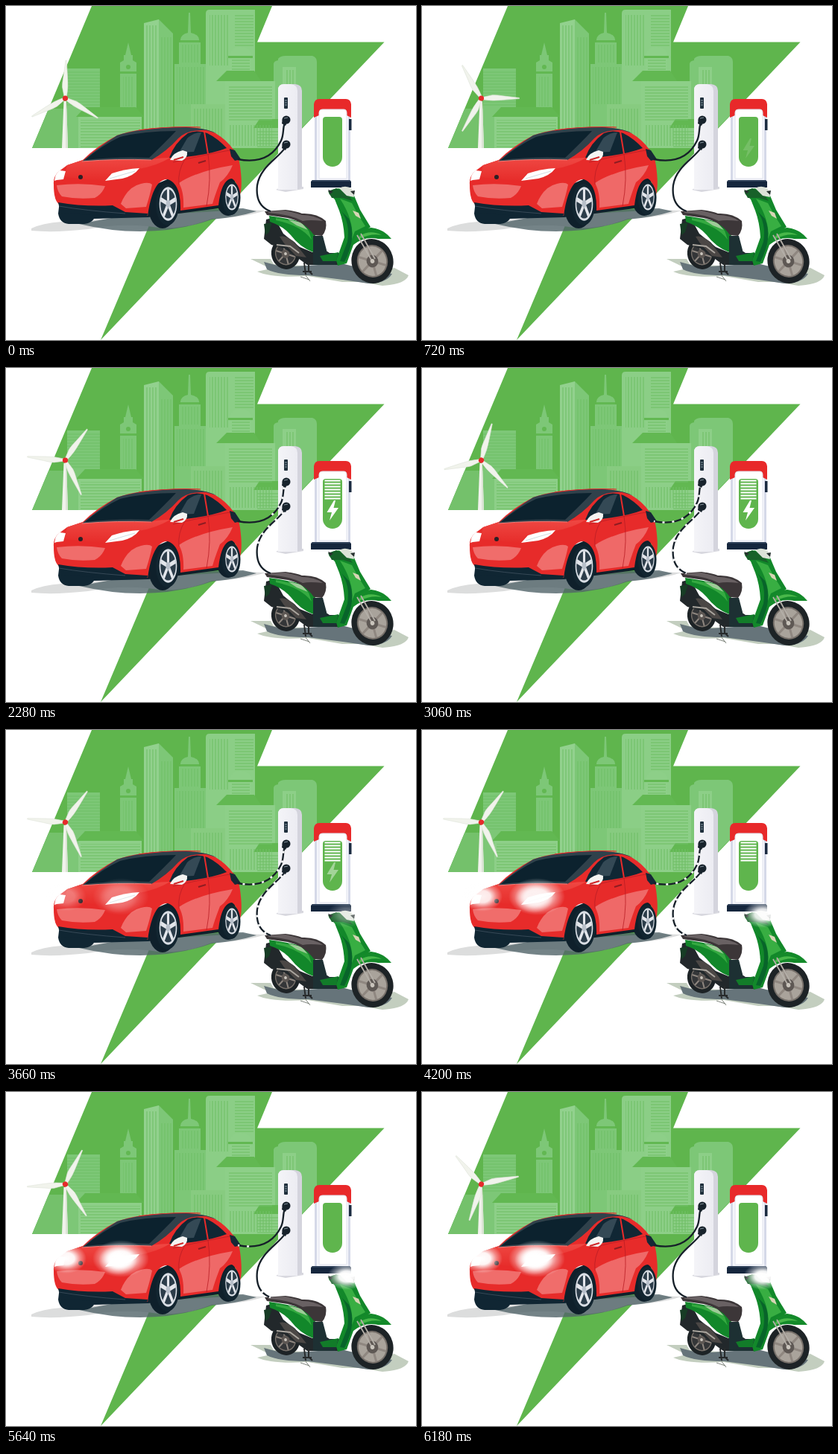
An HTML page that plays this animation: 550 by 449 pixels, repeating every 6.24 s.

```html
<!DOCTYPE html>
<html lang="en">
<head>
<meta charset="utf-8">
<title>Electric charging</title>
<style>
html, body { margin: 0; width: 100%; height: 100%; overflow: hidden; background: #fff; }
svg { display: block; width: 100%; height: 100%; }
</style>
</head>
<body>
<svg viewBox="0 0 550 449">
<defs>
  <pattern id="rows" width="8" height="4" patternUnits="userSpaceOnUse"><path d="M0 1H8" stroke="#6fbf66" stroke-width="1.1"/></pattern>
  <pattern id="cols" width="4" height="8" patternUnits="userSpaceOnUse"><path d="M1 0V8" stroke="#6fbf66" stroke-width="1.1"/></pattern>
  <radialGradient id="beam">
    <stop offset="0" stop-color="#fff"/><stop offset=".4" stop-color="#fff" stop-opacity=".95"/>
    <stop offset=".7" stop-color="#fff" stop-opacity=".4"/><stop offset="1" stop-color="#fff" stop-opacity="0"/>
  </radialGradient>
  <linearGradient id="pillar"><stop offset="0" stop-color="#f4f4f8"/><stop offset="1" stop-color="#ececf2"/></linearGradient>
  <linearGradient id="hood" x2="0" y2="1"><stop offset="0" stop-color="#ef4843"/><stop offset="1" stop-color="#e62b29"/></linearGradient>
  <clipPath id="sky"><path d="M115 0H357L337 49H507L371 191H35Z"/></clipPath>
  <path id="blade" d="M-1.5 -2L-4.2 -15Q-4.5 -20 -3 -29L-.4 -51H.8L2.5 -29Q4 -15 1.8 -2Z" fill="#f1f3ec" stroke="#dfe4da" stroke-width=".6"/>
</defs>

<path d="M115 0H357L337 48.6H507.5L127 449L236 191H35Z" fill="#5fb54d"/>

<g clip-path="url(#sky)">
  <path d="M35 138H98V191H35Z" fill="#74c16b"/>
  <g fill="#7dc777">
    <path d="M82 84H126V191H82Z"/>
    <path d="M153 191V76L158 73V66H160L164 49L168 66H170V73L175 76V191Z"/>
    <path d="M185 23L205 18V191H185Z" fill="#92d18e"/>
    <path d="M205 18L224 37V191H205Z"/>
    <path d="M226 191V78H232V49H234V45Q235 38 244 36L245 9H247L248 36Q258 38 259 45V49H261V78H269V191Z"/>
    <path d="M268 191V10Q268 5 273 5H334V191Z" fill="#8bce86"/>
    <path d="M248 132H296V191H248Z" fill="#87cb80"/>
    <path d="M359 191V78Q359 74 365 73V71Q368 67 375 67H411Q417 69 417 75V191Z"/>
  </g>
  <path d="M82 86H126V136H82ZM307 12H332V55H307Z" fill="url(#rows)"/>
  <path d="M188 26H203V191H188ZM208 42H222V191H208ZM234 52H259V76H234ZM229 82H267V132H229ZM157 95H172V135H157ZM273 12H299V80H273Z" fill="url(#cols)"/>
  <g fill="#8dcf88">
    <path d="M300 66Q302 55 315 55Q328 56 329 66V87H300Z"/>
    <path d="M294 101H361V191H294Z"/>
    <path d="M97 149H182V191H97Z"/>
    <path d="M371 82H389V105H371Z"/>
    <path d="M334 164H370V191H334Z"/>
  </g>
  <g fill="#62b852">
    <path d="M298 67H331V70H298ZM282 101L296 87H333L342 101Z"/>
    <path d="M94 149L106 136H174L185 149Z"/>
    <path d="M332 164L340 152H370V164Z"/>
    <path d="M234 46H259V49H234ZM153 88H175V91H153Z"/>
    <circle cx="164" cy="82" r="3"/>
  </g>
  <path d="M100 153H180V191H100ZM299 107H357V156H299ZM337 168H365V191H337ZM303 72H327V86H303Z" fill="url(#rows)"/>
  <path d="M252 138H292V191H252ZM299 160H357V188H299ZM374 86H387V105H374Z" fill="url(#cols)"/>
</g>

<path d="M77.5 128H81L83 191H75Z" fill="#f1f2ec"/>
<path d="M80 128H81L83 191H80Z" fill="#dce4d6"/>
<g id="rotor">
  <use href="#blade"/><use href="#blade" transform="rotate(120)"/><use href="#blade" transform="rotate(240)"/>
  <circle r="3.6" fill="#e52a2b"/>
</g>

<!-- Charging posts -->
<path d="M362 247L370 243H399V246L375 250Z" fill="#d8d8df"/>
<path d="M365 247V113Q365 105 373 105H388Q397 106 397 114V244L389 247Z" fill="#d4d4dd"/>
<path d="M365 247V113Q365 105 373 105H382Q391 106 391 114V247Z" fill="url(#pillar)"/>
<rect x="373" y="123" width="5" height="15" rx="1" fill="#20303d"/>
<path d="M374 127H377M374 130H377M374 133H377" stroke="#a9bbc2" stroke-width=".8"/>

<path d="M414 145H462V235H414Z" fill="#d5d9e8"/>
<path d="M417 145H459V234H417Z" fill="#f5f6fb"/>
<path d="M413 150V132Q414 125 420 125H456Q462 125 463 132V150L457 147V143Q457 139 453 139H424Q420 139 420 143V147Z" fill="#e8292a"/>
<path d="M420 232V144Q420 139 425 139H453Q457 139 457 144V232Z" fill="#fff" stroke="#dfe2ed"/>
<path d="M460 152H463.5V167H460Z" fill="#1b2b40"/>
<path d="M425 153Q425 149 429 149H447Q451 149 451 153V203A13 13 0 0 1 425 203Z" fill="#5fb54d"/>
<path d="M411 234H461L463 236V244H409V236Z" fill="#15263d"/>
<path d="M411 234H461L462 236H410Z" fill="#2e4058"/>
<path id="levels" fill="none" stroke="#fff" stroke-width="2"/>
<path id="spark" d="M440 178L430.5 194H437L434 205L446 188H439.5L442 178Z" fill="#fff"/>

<!-- Car -->
<path d="M34 299Q48 292 75 290L190 281L318 274L348 275Q322 284 276 286Q230 304 190 296Q150 292 110 300Q65 305 34 302Z" fill="#dcdddd"/>
<path d="M98 293L190 276L318 272L336 276Q310 284 276 287Q232 303 180 303Q140 303 98 293Z" fill="#52646a" fill-opacity=".8"/>
<path d="M190 284L200 240L228 228L305 225L312 262L285 272L232 279Z" fill="#0f202b"/>
<path d="M72 262L70 279Q72 292 84 293H105Q114 292 118 286L192 284V250Z" fill="#102633"/>
<ellipse cx="210" cy="270" rx="19" ry="29" fill="#0f202b"/>
<ellipse cx="298" cy="259" rx="16" ry="23" fill="#0f202b"/>
<path d="M64 240Q63 230 70 223L82 214L103 207Q122 188 149 174Q177 164 220 163Q260 161 281 171Q296 180 305 193Q312 200 314 215Q318 244 313 257Q311 236 303 232Q289 233 285 268L234 275Q235 239 217 233Q197 232 190 282L166 283Q125 275 72 267Q64 263 64 240Z" fill="#e72b2a"/>
<path d="M82 214L103 207L194 206Q210 204 220 204Q202 215 178 219L140 225L132 236Q104 232 78 230Z" fill="url(#hood)"/>
<path d="M102 209Q125 189 149 174Q177 165 220 163Q262 161 282 171L268 167Q243 166 231 178Q216 195 195 207Q149 205 102 209Z" fill="#30414b"/>
<path d="M106 207Q129 187 153 176Q185 168 228 168Q214 183 192 204Q150 202 106 207Z" fill="#0c222e"/>
<path d="M178 167Q222 161 261 163" fill="none" stroke="#e72b2a" stroke-width="1.2"/>
<path d="M102 209Q150 205 195 207" fill="none" stroke="#f57a75"/>
<path d="M219 204Q226 184 244 171Q256 166 270 171Q284 178 296 191Q276 199 240 203Z" fill="#102734"/>
<path d="M232 197L243 178Q251 170 262 170L252 196Z" fill="#344955"/>
<path d="M266 169L271 199" stroke="#e72b2a" stroke-width="2"/>
<path d="M232 238Q256 222 304 214Q298 229 287 237Q280 255 277 266L238 271Q239 250 232 238Z" fill="#ef6968"/>
<path d="M224 210Q275 198 306 193M271 199Q276 233 269 269M240 206Q230 222 232 240" fill="none" stroke="#b91e25" stroke-width=".8"/>
<path d="M258 211L268 208" stroke="#8f1c22" stroke-width="2"/>
<path d="M220 207Q224 197 237 194L243 196Q244 204 236 208Z" fill="#f4f4f2"/>
<path d="M225 207L238 203" stroke="#cf2828" stroke-width="2"/>
<path d="M65 235Q66 225 72 221L80 222L77 233L68 234Z" fill="#fff"/>
<path d="M133 235L142 225Q160 219 179 218Q172 228 156 232Z" fill="#fff"/>
<path d="M139 232L159 226L173 222" fill="none" stroke="#d2dbe0"/>
<circle cx="100" cy="230" r="3" fill="#2b2025"/>
<path d="M68 241Q100 237 133 242Q129 253 119 258Q95 260 75 256Q69 250 68 241ZM154 266Q163 243 181 239Q192 236 196 240Q193 255 188 270L161 272Z" fill="#f06d6b"/>
<path d="M70 264Q104 270 143 268L160 277L190 279L189 284H163Q127 282 73 278Z" fill="#102633"/>
<path d="M71 269Q106 275 160 279" fill="none" stroke="#405260" stroke-width=".8"/>
<g id="wheels"></g>
<path d="M300 192L307 194L315 206L307 208L302 202Z" fill="#162836"/>

<!-- Scooter -->
<path d="M328 340L355 340L359 347L417 350L483 363L521 352L540 362Q536 374 505 376L474 371L451 371L405 363Q356 366 337 357L355 353Z" fill="#c3cebf"/>
<path d="M346 344L372 351L450 346L474 352L518 360Q510 373 486 373L452 368L405 362Q366 362 350 354Z" fill="#66747a"/>
<g id="tyres"></g>
<path d="M349 287L360 284L372 306L394 324L411 331L431 330L446 340V348L404 348L374 326L356 321L346 313Z" fill="#22282b"/>
<path d="M346 293L357 291L353 304L348 308Z" fill="#173c25"/>
<path d="M367 310Q379 307 392 324L403 338L389 336L373 319Z" fill="#4b4745"/>
<path d="M363 321L381 323L393 332" fill="none" stroke="#aaa59e" stroke-width="2"/>
<path d="M353 282Q375 285 400 291L415 307L412 331Q394 324 382 308Q372 296 354 290Z" fill="#12872a"/>
<path d="M362 285Q390 289 406 302L410 314Q396 295 362 288Z" fill="#35aa41"/>
<path d="M378 287L396 291L405 301L390 295Z" fill="#9ecb98"/>
<path d="M347 276L375 274Q390 276 397 279Q417 278 429 289Q431 301 424 309L413 308Q401 290 378 285L350 281Z" fill="#3c3638"/>
<path d="M352 276L375 275Q388 278 397 281Q414 281 425 289Q407 287 398 289Q381 280 352 278Z" fill="#696163"/>
<path d="M412 309H425L431 332L447 332L442 348H412Z" fill="#1d3033"/>
<path d="M421 336L446 331L443 343H425Z" fill="#127c29"/>
<path d="M433 252Q440 243 452 246L467 255L475 274L489 297L477 305L466 321L457 346L445 349L443 342L454 311Q453 291 447 275L441 260Z" fill="#12882a"/>
<path d="M448 259L464 265L472 280L482 296L468 303L464 313Q467 288 448 259Z" fill="#38ae42"/>
<path d="M450 276Q462 292 458 317L448 343L454 344Q471 311 460 286Z" fill="#08642a"/>
<path d="M432 249L443 245L457 251L465 262L452 258L437 258Z" fill="#176129"/>
<path d="M447 245Q456 240 464 246L467 257L457 255Z" fill="#dce2d8"/>
<path d="M432 247L439 249L435 253ZM462 249L468 248L467 254Z" fill="#26302e"/>
<path d="M465 275L473 278L476 286L469 282Z" fill="#d8d5b5"/>
<path d="M465 318Q472 299 490 298Q507 300 517 313L499 313Q481 309 466 321Z" fill="#148a2a"/>
<path d="M474 309Q489 300 504 308Q490 305 474 313Z" fill="#49b84a"/>
<path d="M471 308L490 341M476 306L495 340" stroke="#b4afa8" stroke-width="1.8"/>
<path d="M400 345L402 361M406 344V356L411 361M398 357H410" fill="none" stroke="#272a2b" stroke-width="2"/>
<path d="M395 364L407 368M401 361L408 370" stroke="#7e847c"/>

<!-- Cables -->
<g fill="none" stroke="#162029" stroke-width="2.3">
  <path id="carCable" d="M374 157C371 164 373 173 369 181C358 204 337 211 311 206"/>
  <path id="bikeCable" d="M374 191C365 205 341 216 337 241C335 259 341 271 355 276"/>
  <path id="carFlow" stroke="#fff" stroke-width="2.6"/>
  <path id="bikeFlow" stroke="#fff" stroke-width="2.6"/>
</g>
<g id="plug" fill="#18232c"><circle cx="376" cy="153" r="5.5"/><path d="M371 151L378 155L375 161L370 158Z"/></g>
<use href="#plug" y="33"/>
<path d="M373 151L378 150M373 184L378 183" stroke="#82909a"/>

<g id="lamps" fill="url(#beam)">
  <ellipse cx="81" cy="224" rx="27" ry="20"/>
  <ellipse cx="154" cy="224" rx="38" ry="25"/>
  <ellipse cx="150" cy="226" rx="26" ry="20"/>
  <ellipse cx="457" cy="248" rx="26" ry="18"/>
</g>
</svg>

<script>
const LOOP = 6240, STEP = 60;
const $ = id => document.getElementById(id);
const ramp = (t, from, to) => Math.min(1, Math.max(0, (t - from) / (to - from)));

// Near-constant spin with a rest in the middle and at the end.
const rotorKeys = [[0, 1], [1440, 178.5], [2280, 275], [3060, 376], [3220, 395],
  [4740, 395], [6060, 558], [LOOP, 558]];

function rotorAngle(t) {
  const i = Math.max(1, rotorKeys.findIndex(k => k[0] >= t));
  const [t0, a0] = rotorKeys[i - 1], [t1, a1] = rotorKeys[i];
  return a0 + (a1 - a0) * ramp(t, t0, t1);
}

function spokes(count) {
  let d = '';
  for (let i = 0; i < count; i++) {
    const a = i / count * 2 * Math.PI - Math.PI / 2;
    d += `M0 0L${(Math.cos(a) * .9).toFixed(3)} ${(Math.sin(a) * .9).toFixed(3)}`;
  }
  return d;
}

function wheel(x, y, rx, ry) {
  return `<ellipse cx="${x - 1}" cy="${y + 1}" rx="${rx + 4}" ry="${ry + 6}" fill="#122530"/>
    <g transform="translate(${x} ${y}) scale(${rx} ${ry})">
    <circle r=".96" fill="#2c3d4a" stroke="#d9dee5" stroke-width=".14"/>
    <path d="${spokes(5)}" stroke="#e3e6eb" stroke-width=".27"/>
    <circle r=".25" fill="#b8c0ca"/></g>`;
}

function tyre(x, y, rx, ry, rim) {
  return `<g transform="translate(${x} ${y}) rotate(-15) scale(${rx} ${ry})">
    <circle r="1" fill="#1d2326"/>
    <circle r=".7" fill="${rim}" stroke="#77706a" stroke-width=".07"/>
    <path d="${spokes(6)}" transform="scale(.75)" stroke="#8f8780" stroke-width=".14"/>
    <circle r=".28" fill="#5e5854"/><circle r=".1" fill="#c9c4bc"/></g>`;
}

// White gaps travel along the cable between the tail and head fractions.
function updateFlow(name, t) {
  const cable = $(name + 'Cable'), flow = $(name + 'Flow');
  const length = cable.getTotalLength(), pitch = 13;
  const head = ramp(t, 1500, 2900) * length, tail = ramp(t, 4000, 6100) * length;
  const dashes = [];
  let end = 0;
  for (let s = (t * .03) % pitch - pitch; s < head; s += pitch) {
    const from = Math.max(s, tail), to = Math.min(s + 3, head);
    if (to <= from) continue;
    dashes.push(from - end, to - from);
    end = to;
  }
  flow.style.display = dashes.length ? '' : 'none';
  flow.setAttribute('stroke-dasharray', [0, ...dashes, length + 9].join(' '));
}

function updateLevels(t) {
  const shown = Math.round(7 * ramp(t, 1500, 2160));
  const gone = Math.round(7 * ramp(t, 4680, 5100));
  let d = '';
  for (let i = gone; i < shown; i++) d += `M427.5 ${175.5 - i * 4}H448.5`;
  $('levels').setAttribute('d', d);
}

function render(t) {
  $('rotor').setAttribute('transform', `translate(79.5 124) rotate(${rotorAngle(t)})`);
  $('spark').setAttribute('opacity', ramp(t, 660, 1080) * (1 - ramp(t, 3420, 3840)));
  $('lamps').setAttribute('opacity', ramp(t, 3360, 4260));
  updateLevels(t);
  updateFlow('car', t);
  updateFlow('bike', t);
}

$('wheels').innerHTML = wheel(217.5, 266, 11.5, 22) + wheel(303, 257, 8.5, 17);
$('tyres').innerHTML = tyre(375, 333, 19, 21, '#343638') + tyre(491.5, 343, 28, 30, '#a9a39b');
for (const name of ['car', 'bike']) $(name + 'Flow').setAttribute('d', $(name + 'Cable').getAttribute('d'));

const start = performance.now();
function tick() {
  const t = (performance.now() - start) % LOOP;
  render(Math.floor(t / STEP) * STEP);
  requestAnimationFrame(tick);
}
tick();
</script>
</body>
</html>
```
